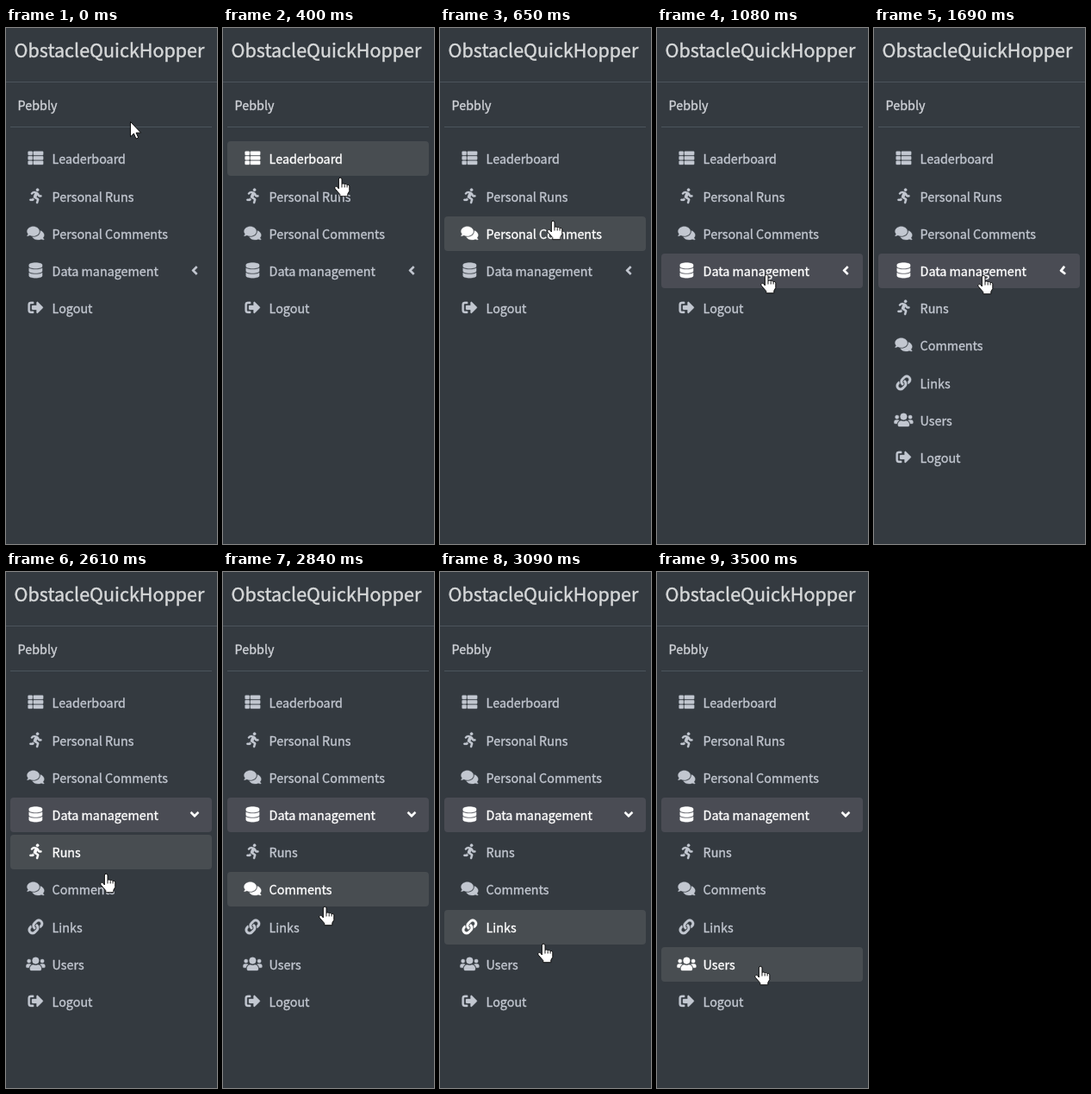
An HTML page for the animation above (3.78 s loop, 245 by 597 pixels).

```html
<!DOCTYPE html>
<html lang="en">
<head>
<meta charset="utf-8">
<title>Sidebar menu</title>
<style>
  html, body { margin: 0; width: 100%; height: 100%; overflow: hidden; background: #343a40; }
  svg { display: block; }
  text {
    font: 14.32px "Noto Sans CJK JP", "Noto Sans CJK SC", "Noto Sans CJK", "Noto Sans", sans-serif;
    white-space: pre; fill: currentColor; stroke: currentColor; stroke-width: .35px;
  }
  .row { color: #c2c7d0; fill: currentColor; }
  .row .bg { fill: none; }
  .row .icon { stroke: currentColor; stroke-width: 9px; }
  .row.lit { color: #fff; }
  .row.lit .bg { fill: #484d51; }
  .row.lit.parent .bg { fill: #4a4c54; }
  .title { font-size: 21.49px; color: #d6d8d9; stroke-width: .45px; }
  .user { color: #d0d3d8; }
  .rule { fill: #4b545c; }
  .cursor { fill: #fff; stroke: #000; stroke-width: .9px; stroke-linejoin: round; }
</style>
</head>
<body>
<svg id="stage" width="245" height="597" viewBox="0 0 245 597">
  <defs>
    <g id="list">
      <rect id="cell" y="32" width="149" height="128" rx="24"/>
      <use href="#cell" y="160"/><use href="#cell" y="320"/>
      <rect id="bar" x="181" y="32" width="331" height="128" rx="24"/>
      <use href="#bar" y="160"/><use href="#bar" y="320"/>
    </g>
    <g id="run">
      <circle cx="272" cy="48" r="48"/>
      <path d="M113.7 317.5L98.900 352H32a32 32 0 0 0 0 64h77.500c19.200 0 36.500-11.400 44-29l8.800-20.600-10.600-6.300c-17.400-10.200-30.100-25.400-38-42.600zM384 224h-44l-26.100-53.300c-12.500-25.500-35.400-44.200-61.800-50.900L181 98.700c-28.300-6.800-57.700-.6-80.800 17.100l-39.700 30.400a32 32 0 0 0 39 50.800l39.700-30.400c7.600-5.900 17.400-8 25.200-6.200l14.700 4.400-37.400 87.400c-12.600 29.500-1.300 64 26.300 80.300l85 50.200-27.500 87.700a32 32 0 0 0 61 19.100l31.700-101c5.900-20.800-2.900-43.100-21.700-54.400l-61.200-36.200 31.300-78.200 20.300 41.400c8 16.300 24.900 26.900 43.100 26.900H384a32 32 0 0 0 0-64z"/>
    </g>
    <path id="chat" d="M416 192c0-88.400-93.100-160-208-160S0 103.600 0 192c0 34.300 14.100 65.900 38 92-13.400 30.200-35.500 54.200-35.800 54.500-4.500 5-1.500 13.500 5.800 13.500 36.600 0 66.900-12.300 88.700-25 32.200 15.700 70.300 25 111.300 25 114.900 0 208-71.600 208-160zm122 220c23.900-26 38-57.700 38-92 0-66.900-53.500-124.200-129.300-148.100.9 6.600 1.300 13.300 1.300 20.100 0 105.900-107.700 192-240 192-10.800 0-21.300-.8-31.700-1.900C207.800 439.600 281.800 480 368 480c41 0 79.100-9.200 111.300-25 21.800 12.700 52.100 25 88.700 25 7.300 0 10.500-8.500 5.800-13.500-.3-.3-22.400-24.200-35.800-54.500z"/>
    <g id="data">
      <path d="M448 73v46c0 40-100 73-224 73S0 159 0 119V73C0 33 100 0 224 0s224 33 224 73z"/>
      <path id="disk" d="M448 176v103c0 40-100 73-224 73S0 319 0 279V176c48 33 136 48.600 224 48.600S400 209 448 176z"/>
      <use href="#disk" y="160"/>
    </g>
    <g id="link">
      <path id="loop" d="M326.600 185.400c59.700 59.800 58.900 155.700 0 215l-67.200 67.200a152 152 0 0 1-215-215l37.100-37.100c9.900-9.900 26.800-3.300 27.300 10.600.7 17.700 3.800 35.500 9.700 52.700 2 5.800.6 12.300-3.800 16.600l-13 13.100c-28.100 28-28.900 73.700-1.200 102 28 28.600 74.100 28.700 102.300.5l67.200-67.200c28.200-28.200 28.100-73.800 0-101.800-3.700-3.700-7.400-6.600-10.300-8.600a16 16 0 0 1-7-12.600c-.4-10.600 3.400-21.500 11.700-29.800l21.100-21.100c5.500-5.500 14.200-6.200 20.600-1.700a152 152 0 0 1 20.500 17.200z"/>
      <use href="#loop" transform="rotate(180 256 256)"/>
    </g>
    <g id="users">
      <circle cx="320" cy="144" r="112"/>
      <path d="M397 288h-8.500c-43 21-94 21-137 0h-8.300C180 288 128 340 128 403v29a48 48 0 0 0 48 48h288a48 48 0 0 0 48-48v-29c0-63-52-115-115-115z"/>
      <g id="peer">
        <circle cx="96" cy="160" r="64"/>
        <path d="M173 274.600C161.500 263 145.600 256 128 256H64a64 64 0 0 0-64 64v32a32 32 0 0 0 32 32h66c6.300-47.400 35-87.300 75-109.400z"/>
      </g>
      <use href="#peer" transform="matrix(-1 0 0 1 640 0)"/>
    </g>
    <path id="exit" d="M497 273L329 441c-15 15-41 4.500-41-17v-96H152a24 24 0 0 1-24-24v-96a24 24 0 0 1 24-24h136V88c0-21.400 25.900-32 41-17l168 168c9.300 9.400 9.300 24.600 0 34zM192 436v-40a12 12 0 0 0-12-12H96a32 32 0 0 1-32-32V160a32 32 0 0 1 32-32h84a12 12 0 0 0 12-12V76a12 12 0 0 0-12-12H96a96 96 0 0 0-96 96v192a96 96 0 0 0 96 96h84a12 12 0 0 0 12-12z"/>
  </defs>

  <text class="title" x="9.600" y="34">ObstacleQuickHopper</text>
  <rect class="rule" y="62" width="245" height="1"/>
  <text class="user" x="13.600" y="95">Pebbly</text>
  <rect class="rule" x="5" y="114" width="234" height="1"/>

  <g id="menu"></g>
  <svg id="submenu" y="304" width="245" height="0"></svg>

  <path id="arrow" class="cursor" d="M-.5.5v17.300l3.900-3.700 2.600 6 2.700-1.200-2.600-5.700h5.500z"/>
  <g id="hand" class="cursor">
    <path d="M-2.600 13V2a1.800 1.800 0 0 1 3.600 0v5.800c.4-1.200 2.900-1 3.200.3.700-1 2.700-.6 2.900.7.900-.8 2.700-.2 2.700 1.300V15.500l-2 3.500v2.700H-1.200V19.500l-5.500-6.300c-1.400-2.100.9-3.700 2.500-2.300z"/>
    <path fill="none" d="M1 8v3.500M4.200 8.500v3M7.100 9v2.500"/>
  </g>
</svg>
<script>
const LOOP = 3780, TOP = 131.8, PITCH = 43.2, PARENT = 3;
const SLIDE_START = 1340, SLIDE_END = 1640, TURN_END = 1940, HOVER_LAG = 30;
const $ = id => document.getElementById(id);
const clamp = p => Math.min(1, Math.max(0, p));
const rowTop = i => Math.floor(TOP + PITCH * i);

// label, icon, icon width in 1/512 em
const items = [
  ["Leaderboard", "list", 512], ["Personal Runs", "run", 416], ["Personal Comments", "chat", 576],
  ["Data management", "data", 448], ["Runs", "run", 416], ["Comments", "chat", 576],
  ["Links", "link", 512], ["Users", "users", 640], ["Logout", "exit", 512]
];
const isChild = i => i > PARENT && i < 8;
const chevron = `<path id="chevron" class="icon" d="M31.700 239l136-136c9.400-9.400 24.600-9.400 34 0l22.500 22.600c9.400 9.400 9.400 24.600 0 34L128 256l96.300 96.400c9.400 9.400 9.400 24.600 0 34L201.700 409c-9.400 9.400-24.600 9.400-34 0l-136-136c-9.400-9.400-9.400-24.600 0-34z"/>`;

items.forEach(([label, icon, width], i) => {
  const scale = 17.6 / 512, y = rowTop(i) - (isChild(i) ? 304 : 0);
  $(isChild(i) ? "submenu" : "menu").insertAdjacentHTML("beforeend",
    `<g id="row${i}" class="row" transform="translate(0 ${y})">
      <rect class="bg" x="5" width="234" height="40" rx="4"/>
      <use class="icon" href="#${icon}" transform="translate(${34.4 - width * scale / 2} 10.6) scale(${scale})"/>
      <text x="53.6" y="26">${label}</text>${i === PARENT ? chevron : ""}</g>`);
});
const rows = items.map((_, i) => $("row" + i));

// pointer path: time, x, y
const path = [
  [0, 145, 108], [20, 145, 109], [250, 141, 146], [520, 134, 195], [600, 133, 217], [650, 132, 223],
  [850, 130, 253], [1050, 128, 285], [1090, 128, 285], [1170, 130, 275], [1290, 128, 286],
  [2090, 128, 286], [2330, 122, 317], [2580, 117, 344], [2610, 117, 349], [2640, 117, 350],
  [2860, 119, 390], [3090, 121, 430], [3160, 121, 438], [3500, 121, 456], [LOOP, 121, 456]
];

function pointer(t) {
  const k = Math.max(1, path.findIndex(p => p[0] >= t));
  const [t0, x0, y0] = path[k - 1], [t1, x1, y1] = path[k];
  const p = clamp((t - t0) / (t1 - t0));
  return [Math.round(x0 + (x1 - x0) * p), Math.round(y0 + (y1 - y0) * p)];
}

function draw(t) {
  const [x, y] = pointer(t);
  const hovered = Math.floor((pointer(Math.max(0, t - HOVER_LAG))[1] + 0.5 - TOP) / PITCH);
  rows.forEach((row, i) => {
    const lit = i === hovered || (i === PARENT && t >= SLIDE_END);
    row.setAttribute("class", "row" + (lit ? " lit" : "") + (i === PARENT ? " parent" : ""));
  });

  const slide = 0.5 - Math.cos(Math.PI * clamp((t - SLIDE_START) / (SLIDE_END - SLIDE_START))) / 2;
  const height = slide * PITCH * 4;
  $("submenu").setAttribute("height", height);
  rows[8].setAttribute("transform", `translate(0 ${Math.floor(TOP + PITCH * 4 + height)})`);

  const turn = clamp((t - SLIDE_END) / (TURN_END - SLIDE_END));
  const angle = -90 * turn * turn * (3 - 2 * turn);
  $("chevron").setAttribute("transform",
    `translate(219 19.5) rotate(${angle}) scale(${1 / 32}) translate(-128 -256)`);

  const onMenu = hovered >= 0;
  $("arrow").setAttribute("visibility", onMenu ? "hidden" : "visible");
  $("hand").setAttribute("visibility", onMenu ? "visible" : "hidden");
  $(onMenu ? "hand" : "arrow").setAttribute("transform", `translate(${x} ${y})`);
}

const start = performance.now();
function tick() {
  draw((performance.now() - start) % LOOP);
  requestAnimationFrame(tick);
}
tick();
</script>
</body>
</html>
```
